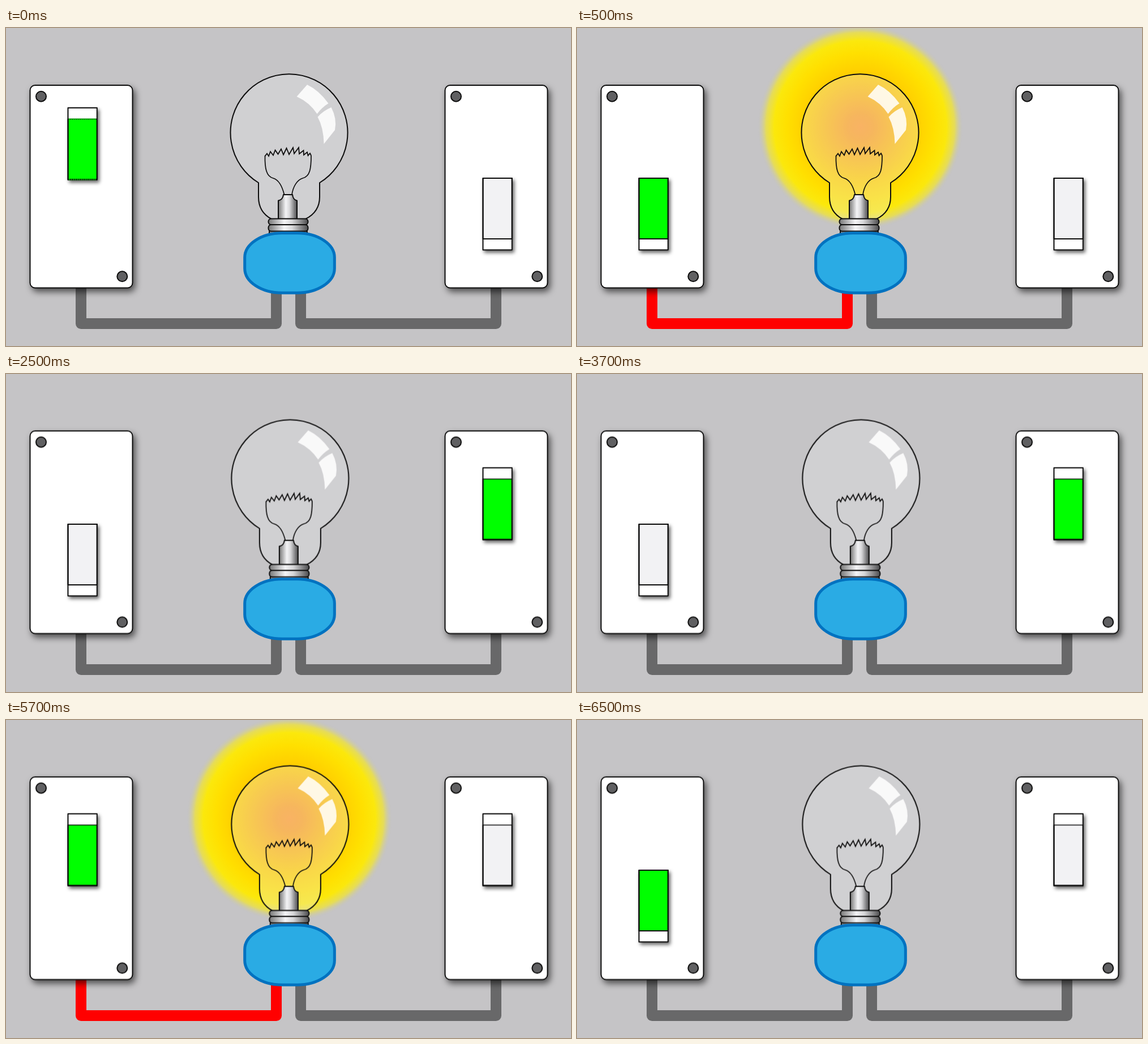
Recreate the animation shown at these times as an HTML page. Size 998 px wide and 561 px high, loop 8000 ms.

```html
<!DOCTYPE html>
<html lang="en">
<head>
<meta charset="utf-8">
<title>Two switches and a lamp</title>
<style>
html, body { margin: 0; width: 100%; height: 100%; overflow: hidden; background: #c5c4c6; }
svg { display: block; width: 100%; height: 100%; }

.line { fill: none; stroke: #0c0c0c; stroke-width: 2; stroke-linejoin: round; }
.wire { fill: none; stroke: #686869; stroke-width: 19; stroke-linejoin: round; }
.plate { filter: drop-shadow(4px 6px 6px rgba(0, 0, 0, .6)); }
.switch { filter: drop-shadow(3px 4px 3px rgba(0, 0, 0, .6)); }
.key { fill: #f2f2f4; }

/* every state change is a hard cut */
.lit, .live, .dots, .nudge, .bulb, .switch, .key { animation: 8s step-end infinite; }
.lit { animation-name: lit; }
.live { animation-name: live; }
.dots { animation-name: dots; }
.nudge { animation-name: nudge; }
.bulb { animation-name: bulb; }
.left .switch { animation-name: left-move; }
.left .key { animation-name: left-key; }
.right .switch { animation-name: right-move; }
.right .key { animation-name: right-key; }

@keyframes lit {
  0%, 31.25%, 81.25% { visibility: hidden; }
  6.25%, 56.25% { visibility: visible; }
}
@keyframes live {
  0%, 31.25%, 81.25% { stroke: #686869; }
  6.25%, 56.25% { stroke: #f00; }
}
@keyframes dots {
  0% { visibility: visible; }
  6.25%, 100% { visibility: hidden; }
}
@keyframes nudge {
  0% { transform: translateY(0); }
  31.25%, 100% { transform: translateY(-.6px); }
}
@keyframes bulb {
  0% { transform: translate(0, 0); }
  31.25%, 100% { transform: translate(1.8px, -.5px); }
}
@keyframes left-move {
  0% { transform: translateY(140.8px); }
  6.25%, 31.25%, 81.25%, 100% { transform: translateY(265px); }
  56.25% { transform: translateY(165.5px); }
}
@keyframes left-key {
  0%, 56.25% { transform: translateY(19.5px); fill: #0f0; }
  6.25%, 81.25%, 100% { transform: translateY(0); fill: #0f0; }
  31.25% { transform: translateY(0); fill: #f2f2f4; }
}
@keyframes right-move {
  0% { transform: translateY(265px); }
  31.25%, 100% { transform: translateY(165.5px); }
}
@keyframes right-key {
  0% { transform: translateY(0); fill: #f2f2f4; }
  31.25% { transform: translateY(19.5px); fill: #0f0; }
  56.25%, 100% { transform: translateY(19.5px); fill: #f2f2f4; }
}
</style>
</head>
<body>
<svg viewBox="0 0 998 561" preserveAspectRatio="none">
  <defs>
    <radialGradient id="glow">
      <stop offset="0" stop-color="#ff9a28"/>
      <stop offset=".12" stop-color="#fb9f20"/>
      <stop offset=".55" stop-color="#ffd000"/>
      <stop offset=".72" stop-color="#ffe000"/>
      <stop offset=".84" stop-color="#fbe80c"/>
      <stop offset=".92" stop-color="#ebe045" stop-opacity=".85"/>
      <stop offset="1" stop-color="#c8c6b8" stop-opacity="0"/>
    </radialGradient>
    <linearGradient id="metal">
      <stop offset="0" stop-color="#777"/>
      <stop offset=".4" stop-color="#f4f4f6"/>
      <stop offset=".6" stop-color="#d8d8da"/>
      <stop offset="1" stop-color="#4c4c4e"/>
    </linearGradient>
    <g id="plate">
      <rect class="line" style="fill:#fff" x="42.5" y="101" width="181" height="357.5" rx="9"/>
      <g class="line" style="fill:#606062">
        <circle cx="62" cy="120.7" r="9"/>
        <circle cx="205.3" cy="438.3" r="9"/>
      </g>
    </g>
  </defs>

  <rect width="998" height="561" fill="#c5c4c6"/>
  <path class="wire live" d="M132.5 440V521.5H477.5V450"/>
  <path class="wire" d="M520.5 450V521.5H865.5V440"/>

  <g class="left">
    <g class="nudge"><use href="#plate" class="plate"/></g>
    <g class="switch">
      <rect x="109.5" width="51.3" height="126.5" fill="#fff"/>
      <rect class="line key" x="109.5" width="51.3" height="107"/>
      <rect class="line" x="109.5" width="51.3" height="126.5"/>
      <path class="dots" d="M111 19.5H160M111 126.5H160" stroke="#0f0" stroke-width="2" stroke-dasharray="1.5 2"/>
    </g>
  </g>
  <g class="right" transform="translate(733)">
    <g class="nudge"><use href="#plate" class="plate"/></g>
    <g class="switch">
      <rect x="109.5" width="51.3" height="126.5" fill="#fff"/>
      <rect class="line key" x="109.5" width="51.3" height="107"/>
      <rect class="line" x="109.5" width="51.3" height="126.5"/>
    </g>
  </g>

  <circle class="lit" cx="500.5" cy="174.5" r="181" fill="url(#glow)"/>

  <g class="bulb">
    <path class="line" style="fill:rgba(236,236,238,.3)"
      d="M469 337C452 328 446 315 446 298V273A103.5 103.5 0 1 1 554 273V298C554 315 547 328 529 337Z"/>
    <path fill="#fff" fill-opacity=".85"
      d="M532 100Q553 110 569.5 133Q558 140 549.5 151.5Q536 131 513.5 121Z
         M574.5 140Q585 160 581 180L561.5 204.5Q561 176 550.5 157Q560 146 574.5 140Z"/>
    <path class="line" style="stroke-width:1.7"
      d="M457.5 225C457 248 460 262 472 265C482 268 488 280 491.5 294
         M539 225C539 248 537 262 524 265C514 268 507 280 505 294"/>
    <path class="line" style="stroke-width:1.8;stroke-linejoin:miter"
      d="M457.5 226L461 221.5L464 226L467 218L472 224.5L475.5 215.5L480.5 222.5L486 213.5L490 223.5L495.5 212L500 223L507 211L509 221.5L517 211L518 222L525.5 216L526 224L532 219L533.5 225L537 221L539 225"/>
    <path class="line" style="fill:url(#metal)"
      d="M490 294H506Q507 303 514 304.5V338H481V304.5Q489 303 490 294Z"/>
    <g class="line" style="fill:url(#metal)">
      <rect x="465" y="355" width="67" height="12" rx="5"/>
      <rect x="463.5" y="347" width="70" height="11.5" rx="5"/>
      <rect x="463.5" y="336.5" width="70" height="10.5" rx="5"/>
    </g>
  </g>

  <rect x="421.7" y="361.7" width="158.6" height="105.6" rx="66" ry="43" fill="#2aabe4" stroke="#0072c0" stroke-width="5"/>
</svg>
</body>
</html>
```
